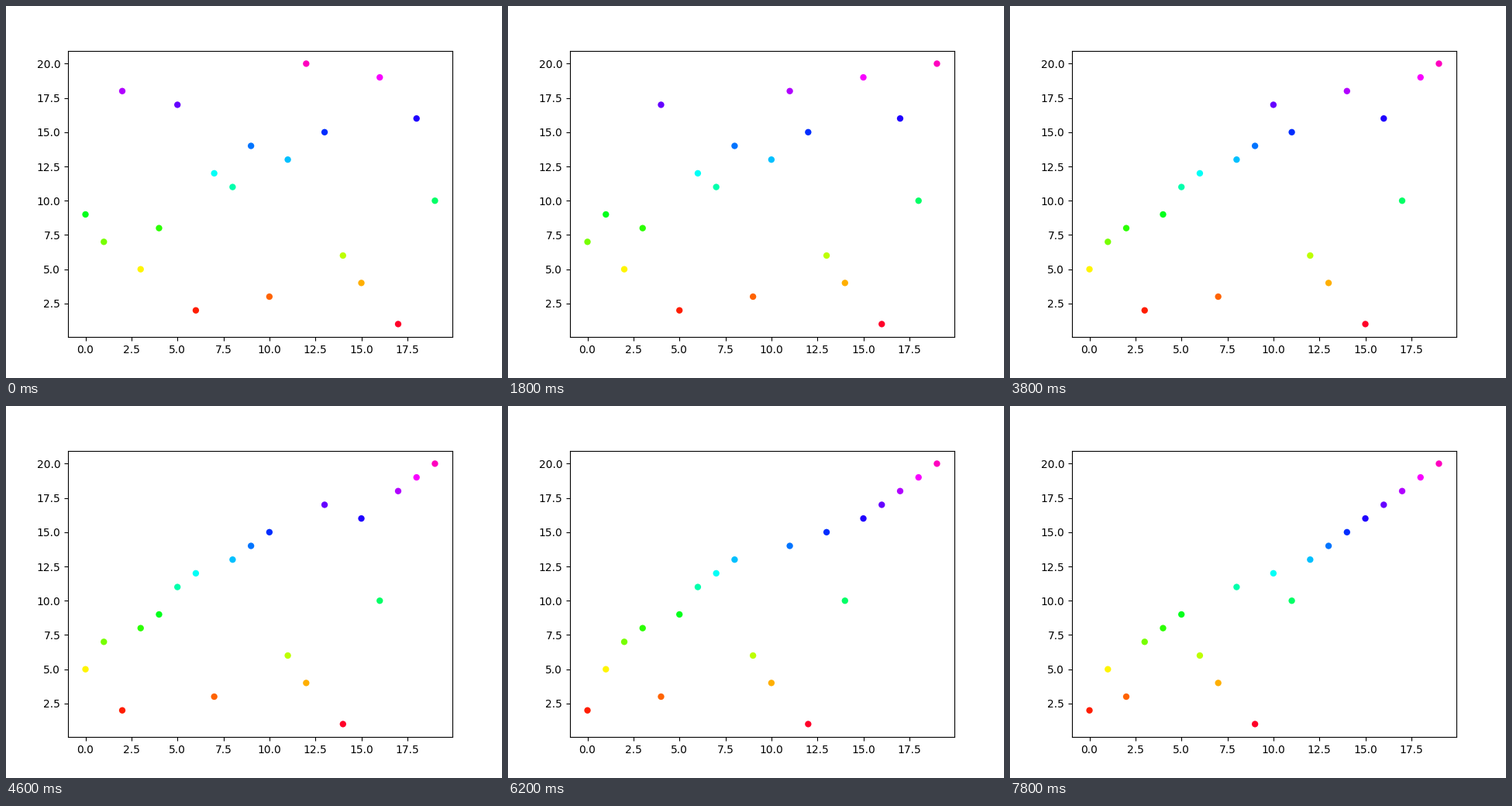
A matplotlib script for the animation above (8 s loop, 640 by 480 pixels).

```python
import numpy as np
import matplotlib.pyplot as plt
from matplotlib.animation import FuncAnimation

FRAMES = 80
INTERVAL = 100  # ms

START = [9, 7, 18, 5, 8, 17, 2, 12, 11, 14,
         3, 13, 20, 15, 6, 4, 19, 1, 16, 10]


def bubble_states(values, first):
    """Yield the list after every swap, and once more after each pass."""
    values = list(values)
    yield tuple(values)
    for end in range(len(values) - 1, 0, -1):
        for j in range(first, end):
            if values[j] > values[j + 1]:
                values[j], values[j + 1] = values[j + 1], values[j]
                yield tuple(values)
        yield tuple(values)
        first = 0


# The first pass is already under way, carrying the value at index 2.
states = list(bubble_states(START, first=2))[:FRAMES]

fig, ax = plt.subplots(figsize=(6.4, 4.8), dpi=100)
index = np.arange(len(START))
dots = ax.scatter(index, START, s=36, c=START, cmap="gist_rainbow",
                  linewidths=0)
ax.set_xlim(-0.95, 19.95)
ax.set_ylim(0.05, 20.95)


def update(frame):
    values = np.array(states[frame])
    dots.set_offsets(np.column_stack([index, values]))
    dots.set_array(values)
    return dots,


anim = FuncAnimation(fig, update, frames=FRAMES, interval=INTERVAL,
                     repeat=True, repeat_delay=0)
plt.show()
```
